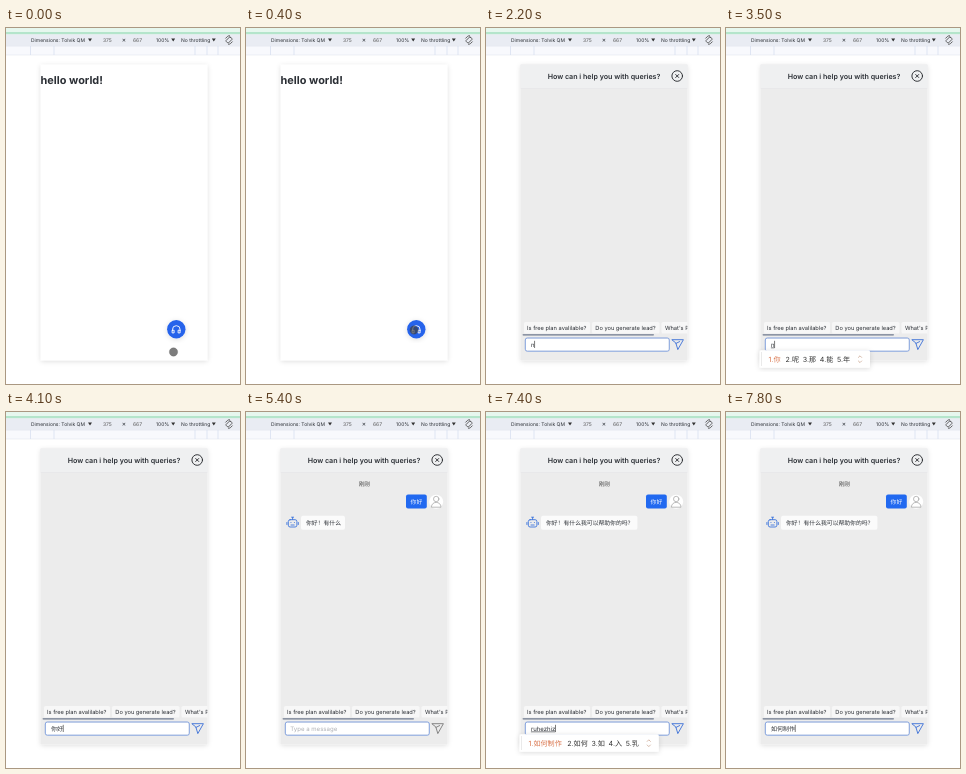
Write an HTML page that moves like this. It is 234 by 356 pixels and loops after 8 s.

```html
<!DOCTYPE html>
<html lang="en">
<head>
<meta charset="utf-8">
<title>Chat widget demo</title>
<style>
html, body { margin: 0; width: 100%; height: 100%; overflow: hidden; background: #fff; }
svg { display: block; width: 234px; height: 356px; }
text { font-family: Inter, "Noto Sans CJK SC", "Noto Sans CJK", sans-serif; text-rendering: geometricPrecision; fill: #2a2e34; white-space: pre; }
.tool text { font-size: 5px; }
.line { fill: none; stroke-linecap: round; stroke-linejoin: round; }
.chip { font-size: 5.7px; }
</style>
</head>
<body>
<svg viewBox="0 0 234 356">
  <defs>
    <filter id="shadow" x="-20%" y="-20%" width="140%" height="140%">
      <feDropShadow dx="0" dy="1" stdDeviation="2.5" flood-color="#000" flood-opacity=".14"/>
    </filter>
    <clipPath id="screen"><rect x="34.5" y="36.5" width="167" height="296"/></clipPath>
  </defs>

  <rect width="234" height="356" fill="#fff"/>
  <rect width="234" height="4" fill="#e6f7ee"/>
  <rect y="4" width="234" height="2.5" fill="#b4e5cb"/>
  <g class="tool">
    <rect y="6.5" width="234" height="11.5" fill="#e9ecf3"/>
    <rect y="18" width="234" height="9" fill="#f8f9fd"/>
    <path d="M0 18.2H234M0 27H234" stroke="#e2e6ef" stroke-width=".6"/>
    <path d="M24.5 18V27M48 18V27M189 18V27M201 18V27M212 18V27" stroke="#d5ddee" stroke-width=".7"/>
    <text x="25" y="13.9">Dimensions: Tolvik QM</text>
    <text x="97" y="13.9" style="fill:#555">375</text>
    <text x="115.8" y="14.2" style="font-size:6.5px">×</text>
    <text x="127" y="13.9" style="fill:#555">667</text>
    <text x="150" y="13.9">100%</text>
    <text x="175" y="13.9">No throttling</text>
    <path d="M82 10.4h4l-2 3.2zM165.2 10.4h4l-2 3.2zM205.8 10.4h4l-2 3.2z" fill="#333"/>
    <g class="line" stroke="#444" stroke-width=".8" transform="rotate(45 223 12)">
      <rect x="221.3" y="9" width="3.4" height="6" rx=".6"/>
      <path d="M219.4 13v-2.4a2.6 2.6 0 0 1 1-2M226.6 11v2.4a2.6 2.6 0 0 1-1 2"/>
    </g>
  </g>

  <rect x="34.8" y="36.8" width="166.5" height="295.5" fill="#fff" filter="url(#shadow)"/>

  <g id="home">
    <text x="34.6" y="56" font-size="10.9" font-weight="700">hello world!</text>
    <circle cx="170.3" cy="301.2" r="9.2" fill="#2563eb" filter="url(#shadow)"/>
    <path class="line" d="M166.5 302.5v-1a3.8 3.8 0 0 1 7.6 0v1M166.5 302.2h1.6v2.7h-1.6zM172.5 302.2h1.6v2.7h-1.6z" stroke="#fff" stroke-width=".9"/>
  </g>

  <g id="chat" clip-path="url(#screen)">
    <rect x="34" y="36" width="168" height="297" fill="#ececec"/>
    <rect x="34" y="36" width="168" height="24.5" fill="#eff0f1"/>
    <path d="M34 60.5H202" stroke="#e6e6e7" stroke-width=".6"/>
    <text x="118" y="50.7" font-size="7.12" font-weight="600" text-anchor="middle">How can i help you with queries?</text>
    <g class="line" stroke="#2a2c30" stroke-width=".95">
      <circle cx="191.2" cy="48" r="5.3"/>
      <path d="M189.7 46.5l3 3M192.7 46.5l-3 3"/>
    </g>

    <g id="talk">
      <text x="118.3" y="73.8" font-size="5.6" text-anchor="middle" style="fill:#444">刚刚</text>
      <rect x="160" y="82.6" width="20.8" height="14" rx="2" fill="#2169f0"/>
      <text x="170.4" y="91.8" font-size="5.8" text-anchor="middle" style="fill:#fff">你好</text>
      <circle cx="190.2" cy="89.7" r="7" fill="#fff"/>
      <g class="line" stroke="#a0a0a0" stroke-width=".7">
        <circle cx="190.2" cy="87" r="2.7"/>
        <path d="M185.4 94.8c0-6 9.6-6 9.6 0z"/>
      </g>
      <g class="line" stroke="#3d74dc" stroke-width=".9">
        <rect x="42.3" y="107.7" width="8.6" height="7.3" rx="1.8"/>
        <path d="M46.6 107.5v-2M45.6 105.2h2M40.9 110.5v2M52.3 110.5v2M45 113h3.2M44.9 110.5h.1M48.3 110.5h.1"/>
      </g>
      <rect id="bubble" x="55" y="103.7" height="14" rx="2" fill="#fbfbfb"/>
      <text id="reply" x="60" y="112.7" font-size="5.83"></text>
      <g id="dots" fill="#666">
        <circle cx="62" cy="110.7" r="1.2"/><circle cx="67" cy="110.7" r="1.2"/><circle cx="72" cy="110.7" r="1.2"/>
      </g>
    </g>

    <g fill="#f7f7f7">
      <rect x="38" y="294" width="66" height="11.5" rx="1.5"/>
      <rect x="106" y="294" width="67.5" height="11.5" rx="1.5"/>
      <rect x="175.5" y="294" width="50" height="11.5" rx="1.5"/>
    </g>
    <text class="chip" x="41" y="301.8">Is free plan avalilable?</text>
    <text class="chip" x="109.3" y="301.8">Do you generate lead?</text>
    <text class="chip" x="178.9" y="301.8">What's Pricing?</text>
    <rect x="36.5" y="306.2" width="131.5" height="1.3" rx=".65" fill="#6f7a8e"/>

    <rect x="39.3" y="310" width="144" height="13.2" rx="2" fill="#fff" stroke="#d8d8d8" stroke-width=".7"/>
    <rect id="focus" x="39.3" y="310" width="144" height="13.2" rx="2" fill="none" stroke="#86a5e2" stroke-width="1"/>
    <text id="hint" x="44.3" y="318.6" font-size="6.07" style="fill:#aeb0b5">Type a message</text>
    <text id="entry" x="44.9" y="318.6" font-size="6"></text>
    <rect id="caret" y="312.8" width=".7" height="7.2" fill="#444"/>
    <path id="send" class="line" d="M186.2 311.7H197.4L191.8 321.6L190 315.4ZM190 315.4L193.6 313.6" stroke-width=".95"/>
  </g>

  <g id="popup">
    <rect id="panel" x="33.5" y="322.2" height="17.6" rx="1.5" fill="#fff" filter="url(#shadow)"/>
    <path class="line" d="M35.6 325V338" stroke="#c4c4c4" stroke-width=".9" stroke-dasharray="0 2"/>
    <g id="choices"></g>
    <path id="arrows" class="line" d="M-1.6 329.4l1.6-1.6 1.6 1.6M-1.6 333l1.6 1.6 1.6-1.6" stroke="#c59b83" stroke-width=".7"/>
  </g>

  <circle id="cursor" r="4.2" fill="#3a3a3a" fill-opacity=".66" stroke="#555" stroke-opacity=".5" stroke-width=".5"/>
</svg>
<script>
const LOOP = 8000, OPEN = 700, FOCUS = 1500, SENT = 4500, REPLY = 5400, READY = 5500;
const $ = id => document.getElementById(id);
const set = (id, attrs) => { for (const k in attrs) $(id).setAttribute(k, attrs[k]); };
const show = (id, on) => { $(id).style.display = on ? '' : 'none'; };
const clamp = v => Math.max(0, Math.min(1, v));

// [time, typed text, input-method candidates]
const edits = [
  [FOCUS, ''], [2200, 'n'], [2300, 'ni'], [2500, 'nih'], [2800, 'ni'], [2900, 'n'], [3000, ''],
  [3400, 'n', '你 呢 那 能 年'], [3600, 'ni', '你 呢 尼 泥 拟'], [3700, 'nih', '你好 你会 你 呢 尼'],
  [3900, 'nihao', '你好 你号 你 呢 尼'], [4100, '你好'], [SENT, ''],
  [6200, 'r', '人 让 如 日 热'], [6900, 'ru', '如 入 乳 茹 汝'], [7000, 'ruh', '如何 如 入 乳 茹'],
  [7100, 'ruhe', '如何 如 入 乳 茹'], [7200, 'ruhezhi', '如何制 如何 如 入 乳'],
  [7400, 'ruhezhiz', '如何制作 如何 如 入 乳'], [7500, 'ruhezhizu', '如何制作 如何 如 入 乳'],
  [7600, 'ruhezhizuo', '如何制作 如何 如 入 乳'], [7700, '如何制作']
];
const replies = [[REPLY, '你好！有什么'], [5500, '你好！有什么我可以帮助'], [5600, '你好！有什么我可以帮助你的吗？']];
const cursorPath = [[0, 167.5, 324], [100, 167.5, 320], [400, 168, 302], [1000, 168, 302], [1100, 163, 297],
  [1200, 153, 303], [1300, 136, 314], [1400, 126, 319]];

const latest = (list, t) => list.filter(item => item[0] <= t).pop();

function along(path, t) {
  const i = path.findIndex(p => p[0] > t);
  if (i < 0) return path[path.length - 1].slice(1);
  const [a, b] = [path[i - 1], path[i]], k = (t - a[0]) / (b[0] - a[0]);
  return [a[1] + (b[1] - a[1]) * k, a[2] + (b[2] - a[2]) * k];
}

function drawPopup(candidates) {
  show('popup', candidates);
  if (!candidates) return;
  let x = 42.5;
  $('choices').innerHTML = candidates.split(' ').map((word, i) => {
    const item = `<text x="${x}" y="333.8" font-size="7.1" style="fill:${i ? '#333' : '#d9734a'}">${i + 1}.${word}</text>`;
    x += 9.9 + 7.2 * word.length;
    return item;
  }).join('');
  set('panel', { width: x - 17.5 });
  set('arrows', { transform: `translate(${x + 6} 0)` });
}

function drawInput(t) {
  const [since, text, candidates] = latest(edits, t) || [Infinity, ''];
  $('entry').textContent = text;
  $('entry').style.textDecoration = candidates ? 'underline' : 'none';
  show('hint', !text);
  show('caret', t >= since && Math.floor((t - since) / 500) % 2 === 0);
  set('caret', { x: 44.8 + (text ? $('entry').getComputedTextLength() : 0) });
  set('focus', { opacity: clamp((t - FOCUS) / 400) });
  set('send', { stroke: t >= SENT && t < READY ? '#808080' : '#4577d8' });
  drawPopup(candidates);
}

function drawReply(t) {
  const text = (latest(replies, t) || [0, ''])[1];
  show('talk', t >= SENT);
  show('dots', t < REPLY);
  $('reply').textContent = text;
  set('bubble', { width: text ? 9 + text.length * 5.83 : 24 });
  [...$('dots').children].forEach((dot, i) =>
    dot.setAttribute('opacity', .6 + .4 * Math.sin((t - SENT) / 130 - i * 1.3)));
}

function render(t) {
  set('chat', { opacity: clamp((t - OPEN + 60) / 120) });
  show('chat', t >= OPEN);
  show('home', t < OPEN + 100);
  drawInput(t);
  drawReply(t);
  const [cx, cy] = along(cursorPath, t);
  set('cursor', { cx, cy });
  show('cursor', t < 2200);
}

const start = performance.now();
function tick() {
  render((performance.now() - start) % LOOP);
  requestAnimationFrame(tick);
}
tick();
</script>
</body>
</html>
```
